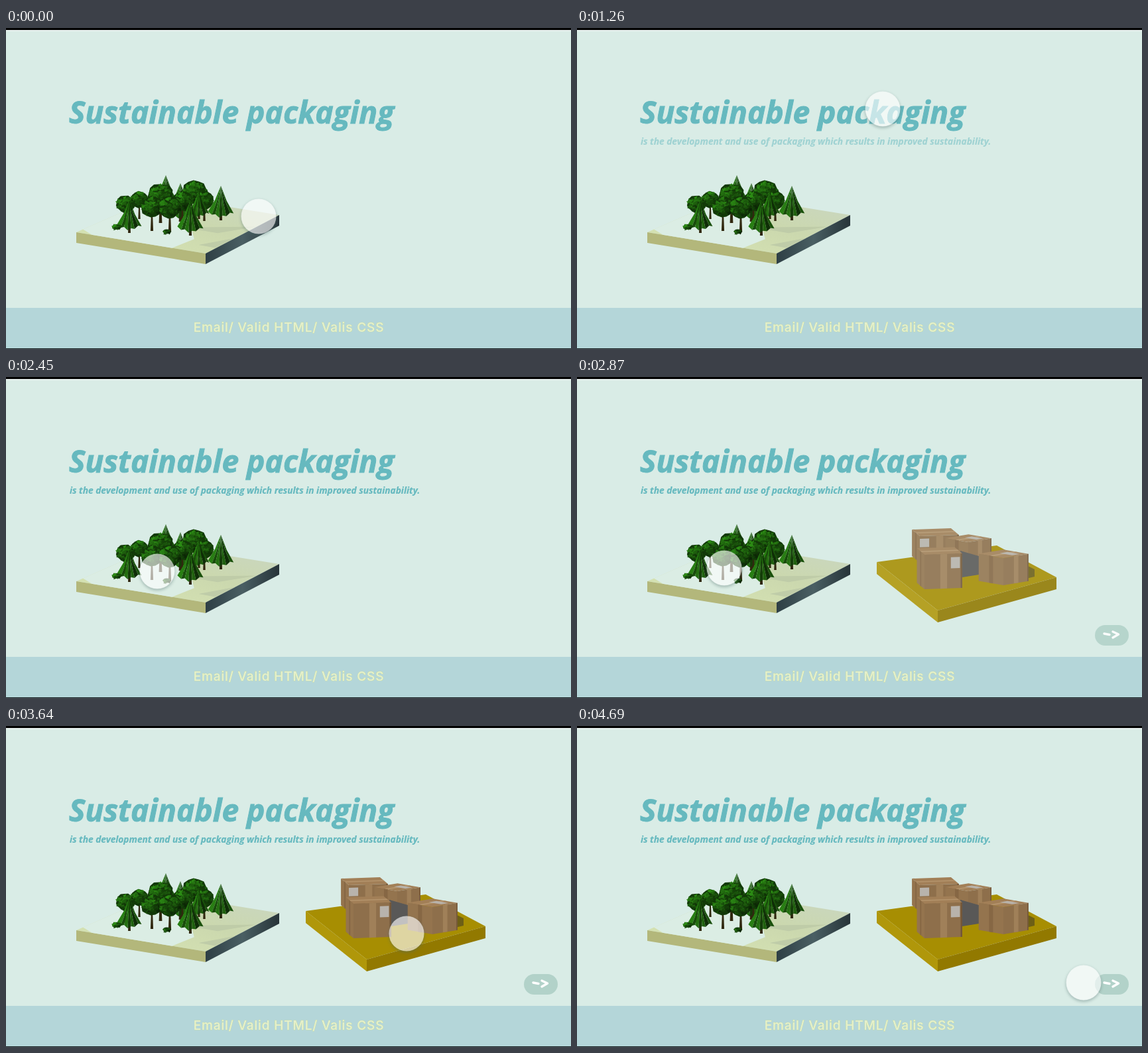
Animation, 852 px wide and 484 px high, one loop 4.76 s. Source, as an HTML page:

```html
<!DOCTYPE html>
<html lang="en">
<head>
<meta charset="utf-8">
<title>Sustainable packaging</title>
<style>
html, body { margin: 0; width: 100%; height: 100%; overflow: hidden; background: #d9ece6; }
svg { display: block; width: 852px; height: 484px; }
.head, .sub { font: italic 700 46.1px "Open Sans", "Noto Sans", sans-serif; fill: #66b9bf; stroke: #66b9bf; }
.sub { font-size: 13.7px; stroke-width: .2px; }
.foot { font: 500 19px Inter, sans-serif; letter-spacing: .85px; fill: #e6f0cc; stroke: #dde87a; stroke-width: .5px; paint-order: stroke; }
</style>
</head>
<body>
<svg viewBox="0 0 852 484">
  <defs>
    <linearGradient id="lawn" x1="0" y1="1" x2="1" y2="0">
      <stop offset="0" stop-color="#d9e6b4"/>
      <stop offset=".55" stop-color="#cbd8ae"/>
      <stop offset="1" stop-color="#c9d6c4"/>
    </linearGradient>
    <linearGradient id="side">
      <stop offset="0" stop-color="#2e3f45"/>
      <stop offset=".5" stop-color="#4a5f63"/>
      <stop offset="1" stop-color="#273439"/>
    </linearGradient>
    <filter id="soft" x="-30%" y="-30%" width="160%" height="160%"><feGaussianBlur stdDeviation="2.2"/></filter>
    <mask id="ring" maskUnits="userSpaceOnUse" x="-40" y="-40" width="80" height="80">
      <rect x="-40" y="-40" width="80" height="80" fill="#fff"/>
      <circle r="26" fill="#000"/>
    </mask>
  </defs>

  <rect width="852" height="484" fill="#d9ece6"/>
  <rect y="3" width="852" height="2" fill="#e8f1ef"/>
  <rect width="852" height="3"/>
  <rect y="422" width="852" height="61" fill="#b4d6d9"/>
  <rect y="483" width="852" height="1" fill="#10181a"/>

  <text class="head" x="95" y="144">Sustainable packaging</text>
  <text class="sub" id="sub" x="96" y="176">is the development and use of packaging which results in improved sustainability.</text>
  <text class="foot" x="426.5" y="458" text-anchor="middle">Email/ Valid HTML/ Valis CSS</text>

  <g id="forest"></g>

  <g id="reveal">
    <g id="depot"></g>
    <rect x="781" y="374" width="51" height="31" rx="15.5" fill="#b2d2c9"/>
    <path d="M795 387 L803 388.5 M808 384 L816.5 388 L808 393" fill="none" stroke="#fff" stroke-width="3.4" stroke-linecap="round" stroke-linejoin="round"/>
  </g>

  <g id="cursor">
    <circle cy="2" r="27" fill="#4b6a68" opacity=".36" filter="url(#soft)" mask="url(#ring)"/>
    <circle r="26.5" fill="#fff" fill-opacity=".63"/>
  </g>
</svg>
<script>
const $ = id => document.getElementById(id);
const TAU = Math.PI * 2;
const clamp = k => Math.max(0, Math.min(1, k));
const mix = (p, q, k) => [p[0] + (q[0] - p[0]) * k, p[1] + (q[1] - p[1]) * k];
const move = (p, dx, dy) => [p[0] + dx, p[1] + dy];
let layer, seed = 11;

function rnd() {
  seed = seed * 16807 % 2147483647;
  return seed / 2147483647;
}

function poly(fill, ...points) {
  const el = document.createElementNS('http://www.w3.org/2000/svg', 'polygon');
  el.setAttribute('points', points.join(' '));
  el.setAttribute('fill', fill);
  layer.append(el);
}

// Flat board seen from above with its two visible sides.
function slab(left, back, right, front, depth, top, near, far) {
  poly(top, left, back, right, front);
  poly(near, left, front, move(front, 0, depth), move(left, 0, depth));
  poly(far, front, right, move(right, 0, depth), move(front, 0, depth));
}

const green = light => `hsl(108, 74%, ${8 + 24 * clamp(light)}%)`;

function trunk(x, ground, size) {
  const w = size * .04;
  poly('#30280f', [x - w, ground], [x - w / 2, ground - size / 2], [x + w / 2, ground - size / 2], [x + w, ground]);
}

// Ragged blob covered with facets lit from the upper left.
function blob(x, y, rx, ry) {
  const at = (a, r) => [x + Math.cos(a) * rx * r, y + Math.sin(a) * ry * r];
  const rim = Array.from({ length: 15 }, (_, i) => at(i / 15 * TAU, .92 + rnd() * .16));
  poly(green(.2), ...rim);
  for (let i = 0; i < rx * ry / 3; i++) {
    const a = rnd() * TAU, r = Math.sqrt(rnd()) * .86, c = at(a, r);
    const light = .5 - r * (Math.cos(a) * .3 + Math.sin(a) * .45) + (rnd() - .5) * .5;
    poly(green(light), ...[0, 1, 2].map(j => {
      const b = a + j * TAU / 3 + rnd();
      return move(c, Math.cos(b) * 3.6, Math.sin(b) * 2.8);
    }));
  }
}

function round(x, ground, size) {
  trunk(x, ground, size);
  blob(x, ground - size * .7, size * .32, size * .3);
}

// Conifer: strips fan out from the tip, bright on the left and dark on the right.
function pine(x, ground, size) {
  trunk(x, ground, size);
  const tip = [x, ground - size], n = 7;
  const hem = i => {
    const u = i / n * 2 - 1;
    return [x + u * size * .37, ground - size * (.1 + Math.abs(u) * .14) + (i % 2 ? 2 : -1)];
  };
  const waist = i => move(mix(tip, hem(i), .55), (n / 2 - i) * size * .01, 0);
  for (let i = 0; i < n; i++) {
    poly(green((i % 2 ? .45 : .85) - i * .07), tip, waist(i), hem(i), hem(i + 1), waist(i + 1));
  }
}

function forest() {
  layer = $('forest');
  const left = [106, 308], back = [232, 253], right = [412, 282], front = [301, 340];
  slab(left, back, right, front, 16, 'url(#lawn)', '#b3b77b', 'url(#side)');
  poly('#dbede4', mix(left, back, .08), back, mix(back, right, .2), mix(back, front, .75), mix(left, front, .74), mix(left, front, .12));
  // Long tree shadows
  for (const k of [.3, .6]) {
    const a = mix(back, front, k + .25), b = mix(right, front, k);
    poly('#bfcca8', a, mix(a, b, .8), b, mix(a, b, .45).map((v, i) => v + i * 9));
  }

  round(201, 288, 42);
  pine(241, 280, 58);
  round(285, 291, 61);
  round(299, 291, 44);
  pine(263, 292, 58);
  round(233, 294, 60);
  round(266, 296, 50);
  pine(291, 288, 42);
  round(180, 296, 44);
  pine(186, 309, 50);
  round(220, 306, 52);
  round(247, 308, 54);
  blob(167, 300, 7, 4);
  blob(243, 307, 6, 3.5);
  pine(278, 313, 53);
  pine(324, 290, 52);
}

// Square carton standing on its front corner, turned about the vertical.
function carton(x, y, turn, w, h, label) {
  const s = Math.sin(turn) * w, c = Math.cos(turn) * w, flat = .17;
  const front = [x, y], left = [x - s, y - c * flat], right = [x + c, y - s * flat];
  const up = p => move(p, 0, -h);
  const back = up([x + c - s, y - (c + s) * flat]);
  const face = (p, q, a, b, fill, lo = 0, hi = 1) => {
    const m = mix(p, q, a), n = mix(p, q, b);
    poly(fill, move(m, 0, -h * lo), move(m, 0, -h * hi), move(n, 0, -h * hi), move(n, 0, -h * lo));
  };
  const lid = (a, b, c1, c2, fill) => {
    const at = (u, v) => mix(mix(up(left), up(front), u), mix(back, up(right), u), v);
    poly(fill, at(a, c1), at(b, c1), at(b, c2), at(a, c2));
  };
  lid(0, 1, 0, 1, '#a27f57');
  lid(.42, .58, 0, 1, '#b4946c');
  face(left, front, 0, 1, '#94744e');
  face(left, front, .42, .58, '#866744');
  face(front, right, 0, 1, '#8e6f4b');
  face(front, right, .42, .6, '#a08059');
  face(front, right, .96, 1, '#715537');
  if (label === undefined) lid(.35, .85, .5, .8, '#b8b2aa');
  else face(front, right, label, label + .24, '#b8b3ac', .58, .9);
}

function depot() {
  layer = $('depot');
  slab([452, 279], [633, 254], [723, 302], [544, 352], 18, '#a78e02', '#b0970a', '#927900');
  poly('#6d5f16', [660, 308], [690, 301], [690, 290], [678, 284]);
  carton(517, 280, .2, 60, 40, 0);
  carton(590, 284, .78, 49, 35);
  poly('#595857', [578, 262], [606, 270], [606, 298], [581, 302]);
  carton(524, 320, .2, 58, 52, .7);
  carton(643, 314, .78, 53, 41);
}

// Pointer stops: x, y, time of arrival, time of leaving.
const stops = [
  [381, 284, 0, 0],
  [461, 122, 770, 1680],
  [228, 293, 2380, 2450],
  [222, 288, 2870, 2870],
  [604, 313, 3570, 3850],
  [797, 388, 4340, 4480],
  [764, 387, 4690, 4760]
];
const LOOP = 4760, STEP = 70;
const ramp = (t, a, b) => clamp((t - a) / (b - a));
const ease = k => k * k * (3 - 2 * k);

function draw() {
  const t = Math.floor(performance.now() % LOOP / STEP) * STEP;
  const i = Math.max(1, stops.findIndex(s => t <= s[3]));
  const from = stops[i - 1], to = stops[i];
  const [x, y] = mix(from, to, ease(ramp(t, from[3], to[2])));
  $('cursor').setAttribute('transform', `translate(${x} ${y})`);
  $('sub').setAttribute('opacity', ramp(t, 1120, 1400));
  $('reveal').setAttribute('opacity', ramp(t, 2590, 2910));
  requestAnimationFrame(draw);
}

forest();
depot();
draw();
</script>
</body>
</html>
```
